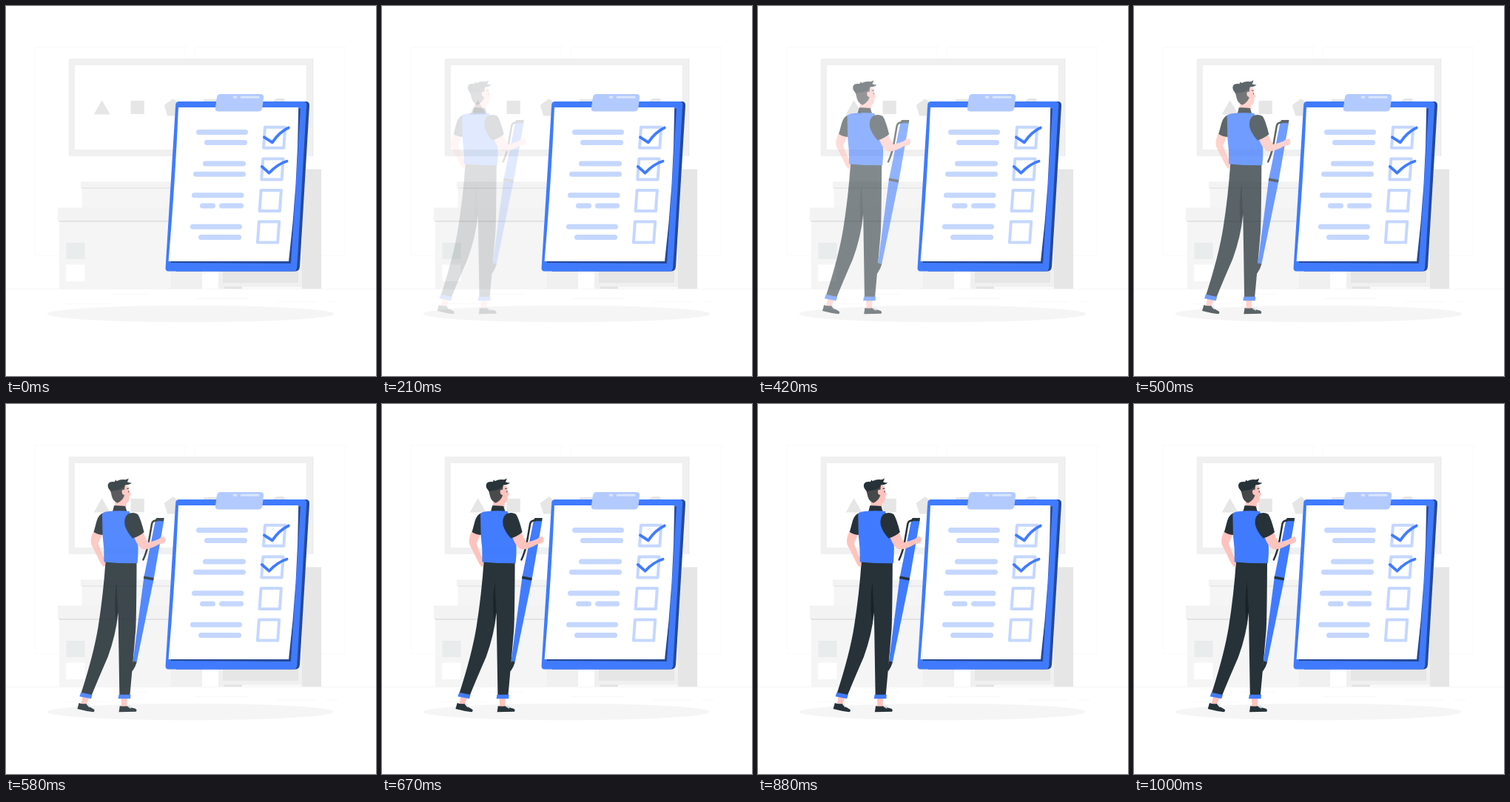
An HTML page with a canvas that plays this animation: 500x500 px, repeating every 1040 ms.

```html
<!DOCTYPE html>
<html lang="en">
<head>
<meta charset="utf-8">
<title>Checklist</title>
<style>
  html, body { margin: 0; width: 100%; height: 100%; overflow: hidden; background: #fff; }
  canvas { display: block; width: 500px; height: 500px; }
</style>
</head>
<body>
<canvas id="stage" width="500" height="500"></canvas>
<script>
const SIZE = 500, LOOP = 1040, FPS = 24;
const BLUE = '#407bff', PALE = '#c5d7ff', SHADE = '#264a99';
const INK = '#263238', SKIN = '#ffc3bd';

const stage = document.getElementById('stage').getContext('2d');
const scene = layer(), actor = layer();

function layer() {
  const c = document.createElement('canvas');
  c.width = c.height = SIZE;
  return c.getContext('2d');
}

function fill(g, color, d) {
  g.fillStyle = color;
  g.fill(new Path2D(d));
}

function line(g, color, width, d) {
  g.strokeStyle = color;
  g.lineWidth = width;
  g.lineCap = g.lineJoin = 'round';
  g.stroke(new Path2D(d));
}

function box(g, color, x1, y1, x2, y2) {
  g.fillStyle = color;
  g.fillRect(x1, y1, x2 - x1, y2 - y1);
}

function drawRoom(g) {
  box(g, '#fff', 0, 0, SIZE, SIZE);
  for (const x of [39.5, 255.5]) line(g, '#fafafa', 1, `M${x} 55.5h203v282h-203z`);

  // whiteboard
  box(g, '#e6e6e6', 413, 71, 415.3, 203);
  box(g, '#f0f0f0', 84.7, 71, 414.3, 203);
  box(g, '#fff', 93, 80, 405.5, 194);
  fill(g, '#e6e6e6', 'M129.6 127.2L140.7 146.6H118.7z');
  box(g, '#e6e6e6', 168.6, 128, 186.8, 146);
  fill(g, '#e6e6e6', 'M225.8 125.2L237 134L232.5 148.4H218.2L213.8 134z');
  box(g, '#e6e6e6', 267, 126, 285, 144);
  fill(g, '#e6e6e6', 'M359 134Q361 125 368 125H374Q377 125 377 129V140H359z');

  // cartons
  box(g, '#f5f5f5', 102.5, 245, 223, 275);
  box(g, '#f3f3f3', 101, 237.5, 223, 246);
  box(g, '#e6e6e6', 102.5, 245.5, 223, 247);
  box(g, '#f5f5f5', 72, 290, 223, 382);
  box(g, '#f0f0f0', 223, 290, 265, 382);
  box(g, '#f3f3f3', 70, 272.5, 223, 291);
  box(g, '#e2e2e2', 72, 290, 223, 292);
  box(g, '#e9ecec', 81.5, 320, 106.5, 342);
  box(g, '#fff', 81.5, 349.5, 106.5, 372);

  // cabinet
  box(g, '#f0f0f0', 287, 230, 400, 382);
  box(g, '#e6e6e6', 293, 340, 395, 374);
  box(g, '#e6e6e6', 400, 220.5, 426, 382);
  box(g, '#e2e2e2', 295, 379.5, 319, 382);
  box(g, '#fafafa', 319, 379.5, 400, 382);

  // floor
  box(g, '#f2f2f2', 0, 382, SIZE, 382.7);
  const marks = [[145, 192, 389.5], [256, 328, 395.3], [367, 420, 399.5], [433, 448, 399.5], [80, 140, 402]];
  for (const [a, b, y] of marks) box(g, '#f5f5f5', a, y, b, y + 0.7);
  g.beginPath();
  g.ellipse(249.5, 416, 193.8, 11.3, 0, 0, 7);
  g.fillStyle = '#f5f5f5';
  g.fill();
}

function drawBoard(g) {
  fill(g, SHADE, 'M240 129H405Q410.3 129 410 134.5L397 352Q396.5 358.5 391 358.5H230z');
  fill(g, BLUE, 'M234 129H402Q406.6 129 406.2 133.5L393.2 353Q392.8 358.5 388 358.5H219.5Q215.3 358.5 215.6 353.5L229.2 133.5Q229.5 129 234 129z');
  fill(g, SHADE, 'M394 137L398 139L385 348L223 347V344z');
  fill(g, '#fff', 'M233 137H395.2Q394.5 240 382 345H219.6Q228.5 240 233 137z');

  fill(g, '#b3caff', 'M290 119H343.5Q348.8 119 348.2 124L346.4 137.5Q345.7 142.6 341 142.6H287Q282.4 142.6 283 137.5L284.8 124Q285.5 119 290 119z');
  line(g, '#d9e5ff', 3, 'M308 123.3h3M318 123.3h23');

  const rows = [[257, 327, 170.5], [268, 326, 184.5], [266, 324, 213], [253, 324, 227.3],
    [251, 321.5, 255.7], [262, 283, 270], [288, 321, 270], [249, 319, 298.2], [260, 318, 312.4]];
  for (const [a, b, y] of rows) line(g, PALE, 7, `M${a + 3.5} ${y}H${b - 3.5}`);

  for (let i = 0; i < 4; i++) {
    line(g, PALE, 4, `M${350 - 2.7 * i} ${163.8 + 42.6 * i}h27.3l-2 28h-27.3z`);
  }
  line(g, BLUE, 3.8, 'M349 177.3L359.8 184.3Q370 170 381.8 164.6');
  line(g, BLUE, 3.8, 'M345.8 217L355.5 225.7Q367 213.5 379.5 209.8');
}

function drawPen(g) {
  fill(g, BLUE, 'M205.3 157.5L216.8 157.5L203 237L180 349L175 347.5L189.8 234z');
  fill(g, INK, 'M207 154H217.2L216.5 158.2L204 158z');
  fill(g, INK, 'M190 232.4L203.2 235L202.4 238.6L189.3 236z');
  fill(g, INK, 'M175 347.2L180.2 348.8Q178.5 355 174 361.5L173 358z');
  line(g, INK, 2.5, 'M207 157.6Q201.5 157.5 200.5 162L196 188Q193 202 188.8 210.5');
}

function drawLegs(g) {
  fill(g, SKIN, 'M107 395L115.5 397L112 406.5L105 405z');
  fill(g, SKIN, 'M159 396H167.2L166.8 409H159.3z');
  fill(g, INK, 'M102 404Q107 406 112 405Q116 410 122.5 412.7Q124 415 121.5 416.2Q111 415 99.8 412z');
  fill(g, INK, 'M157.2 408Q162 409 168 408Q172 411 178.5 411.8Q181 414 179.2 415.8L156 416.3z');
  line(g, '#dbe3ec', 1.2, 'M112.8 405.5l3.2 3.8M114.5 404.6l1 2M168 408.5l4 2.4M170 407.2l1.4 1.8');

  fill(g, INK, 'M138 212L180 213.5Q179.6 290 178.6 306Q174 360 170.8 394H156.8L155 282Q152 312 141 342Q127 374 119 394L105 390.5Q122 338 128 301Q135 257 138 212z');
  fill(g, '#192226', 'M153 240Q149 262 151.5 293Q153.5 289 155 278Q153 258 153 240z');
  fill(g, BLUE, 'M104.6 389.8L120 393L118.4 398.3L102.8 395.2z');
  fill(g, BLUE, 'M155.8 392.8H172L171.5 398.3H155z');
}

function drawTorso(g) {
  fill(g, SKIN, 'M122 171Q116.5 183 118.8 190Q125 202 131.2 215L134.5 219.8L137.5 219V210Q132 201 128 188.5L134 175z');
  fill(g, INK, 'M135 147Q128 150 126 158L122 173Q128 177 135.5 177z');
  fill(g, SKIN, 'M151 130H166V140L163 146H150z');
  fill(g, INK, 'M149.5 137.2Q157 137 164.5 138L167.5 147H147z');
  fill(g, BLUE, 'M133.4 149Q134 146 141 145.2Q156 143.4 170 145L180 170Q183.5 194 181 215.2Q158 215.5 135.8 213.4Q136.5 196 134 178z');
}

function drawArm(g) {
  fill(g, SKIN, 'M176 178L188.5 173Q192 181 195.5 187Q203 185.5 210 182.5Q213.5 178.8 217 179Q219.8 182 218.8 186Q216 189 210 189.5Q201 195 192 196.5Q187 196.8 184.5 194Q179 188 176 178z');
  fill(g, INK, 'M168 148.8Q175 145 181.5 149Q185.5 155 190 173.2Q184 178.5 174.5 181.5Q167 173.5 164 164Q162.2 154 168 148.8z');
}

function drawHead(g) {
  fill(g, SKIN, 'M151 116L162 109L168.8 111.5L170 118L172.5 122.3L170.3 124.2Q170.5 133 165.5 134.5Q160 136 155 133z');
  fill(g, '#47484a', 'M143.8 114Q154 116 164 110L163.5 116Q160 115 160 119Q160.5 123 163.5 123Q162 130 154 133.8Q148 131 146.5 125z');
  fill(g, INK, 'M145 118Q139.5 112 141.5 108Q143 104.5 150 105.2Q151 103 152.2 102.2L152.6 104.2Q160 101 164 102.3Q167 102.5 169 100.3Q168.8 103.4 167.2 105.3Q170 106.7 173.3 106.6Q170.5 109.6 164.5 109.4Q163 114.3 154 116.5Q148 117 145 118z');
  line(g, INK, 1, 'M167 114.5l2.2 -.5M169.2 117.8v1.2');
}

// y of cubic-bezier(.36, -.01, .5, 1.38) at x
function ease(x) {
  const bez = (s, a, b) => 3 * (1 - s) ** 2 * s * a + 3 * (1 - s) * s * s * b + s ** 3;
  let lo = 0, hi = 1;
  for (let i = 0; i < 30; i++) {
    const mid = (lo + hi) / 2;
    if (bez(mid, 0.36, 0.5) < x) lo = mid; else hi = mid;
  }
  return bez(lo, -0.01, 1.38);
}

function render(ms) {
  // steps of 1/24 s, each starting on a whole 10 ms
  const tick = Math.floor(ms / 10);
  const step = Math.ceil((tick + 0.5) * FPS / 100) - 1;
  stage.drawImage(scene.canvas, 0, 0);
  if (step < 3) return;

  const p = ease(Math.min(1, step / FPS));
  actor.setTransform(1, 0, 0, 1, 0, 0);
  actor.clearRect(0, 0, SIZE, SIZE);
  actor.translate(30 * (p - 1), 0);
  for (const part of [drawLegs, drawPen, drawTorso, drawArm, drawHead]) part(actor);

  stage.globalAlpha = Math.min(1, Math.max(0, p));
  stage.drawImage(actor.canvas, 0, 0);
  stage.globalAlpha = 1;
}

drawRoom(scene);
drawBoard(scene);

const start = performance.now();
function loop() {
  render((performance.now() - start) % LOOP);
  requestAnimationFrame(loop);
}
loop();
</script>
</body>
</html>
```
